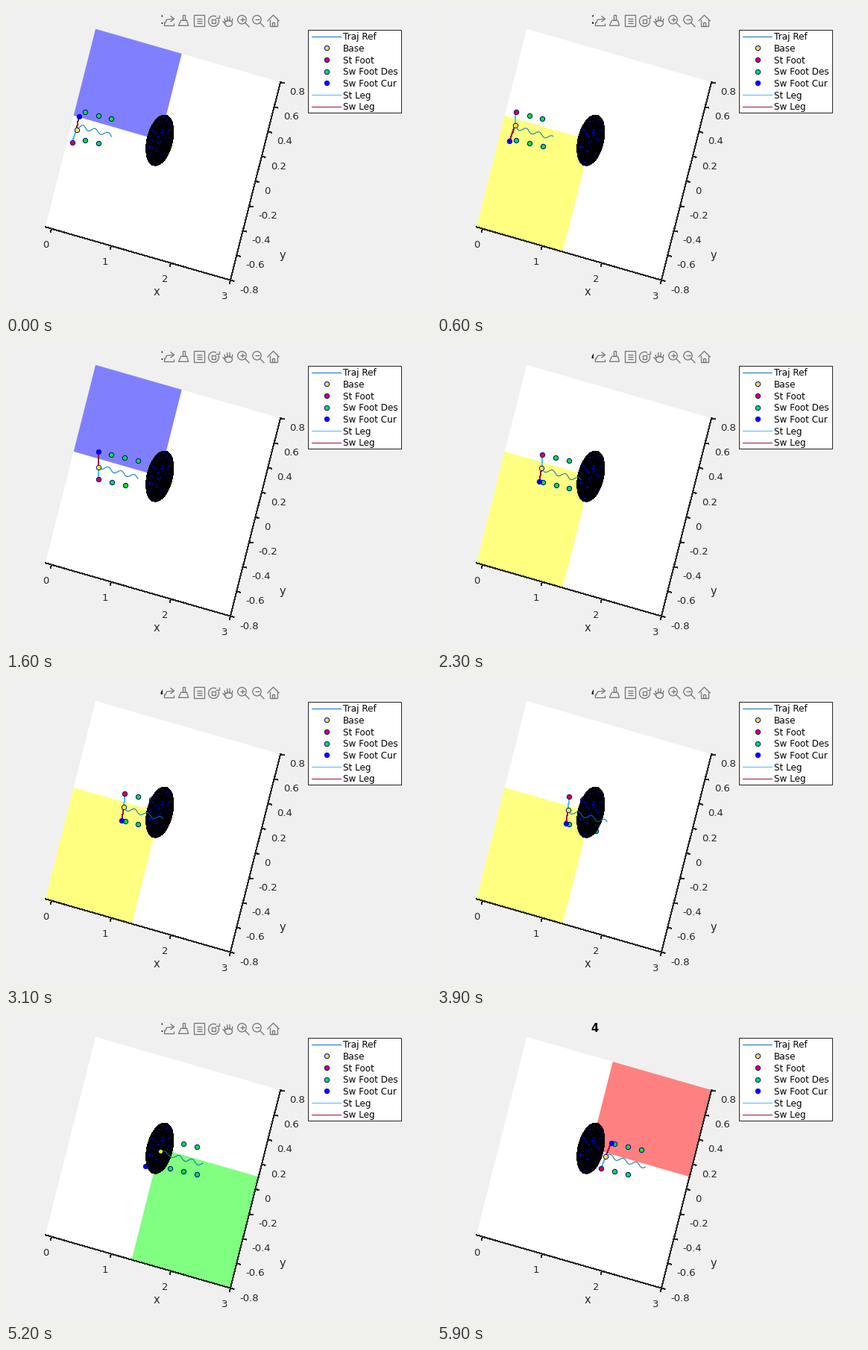
Recreate the animation shown at these times as a matplotlib script. Size 570x413 px, loop 6 s.

```python
import math

import numpy as np
import matplotlib.pyplot as plt
from matplotlib.animation import FuncAnimation
from matplotlib.patches import Polygon, Rectangle, Circle, Arc, Ellipse
from matplotlib.tri import Triangulation

W, H = 570, 413
FRAMES, INTERVAL = 60, 100
PHASES = 4                 # frames per walking step
TOOLBAR_END = 53           # toolbar disappears once the pointer leaves
REPLAN = 10                # step at which the plan bends around the disc
PX = 0.72                  # one pixel in points at 100 dpi
INK, BG, GREY = "#262626", "#f0f0f0", "#757575"
TRAJ, ST_LEG, SW_LEG = "#0072bd", "#4dbeee", "#a2142f"
CENTER_X, CENTER_Y, RADIUS = 1.345, 0.1, 0.2

plt.rcParams["font.family"] = "DejaVu Sans"
fig = plt.figure(figsize=(W / 100, H / 100), dpi=100, facecolor=BG)
ax = fig.add_axes([0, 0, 1, 1])
ax.set_xlim(0, W)
ax.set_ylim(H, 0)
ax.axis("off")


def project(x, y):
    """Floor coordinates to stage pixels."""
    return 94.5 + 80 * x + 42 * y, 165.8 + 23 * x - 166 * y


def line(xs, ys, color=INK, width=1, z=2, smooth=False):
    return ax.plot(xs, ys, color=color, lw=width * PX, zorder=z,
                   solid_capstyle="butt", antialiased=smooth)[0]


def text(x, y, s, size, ha="left", color=INK, z=4, **kw):
    return ax.text(x, y, s, fontsize=size * PX, ha=ha, va="baseline",
                   color=color, zorder=z, **kw)


def marker(color, z, edge="#0000c8", size=6.2):
    return ax.plot([], [], "o", ms=size * PX, mfc=color, mec=edge,
                   mew=1.1 * PX, zorder=z)[0]


def floor_patch(x0, x1, y0, y1, color, z):
    corners = [(x0, y0), (x1, y0), (x1, y1), (x0, y1)]
    patch = Polygon([project(*c) for c in corners], fc=color, ec="none", zorder=z)
    return ax.add_patch(patch)


# --- floor, axes, disc and legend ---

def draw_axes():
    floor_patch(-0.1, 3, -0.8, 0.8, "white", 0)
    line(*project(np.array([-0.1, 3, 3]), np.array([-0.8, -0.8, 0.8])))
    for i in range(4):
        x, y = project(i, -0.8)
        line([x, x - 1.3], [y, y + 5])
        text(x - 7.6, y + 25.7, str(i), 13.3, "center")
    for i in range(-4, 5):
        x, y = project(3, i / 5)
        line([x, x + 5], [y, y + 1.4])
        text(x + 12, y + 17, f"{i / 5:g}", 13.3)
    text(202.3, 388.5, "x", 14.6, "center")
    text(371, 339.5, "y", 14.6, "center")


def ring(radius, angle):
    return project(CENTER_X + radius * np.cos(angle),
                   CENTER_Y + radius * np.sin(angle))


def draw_disc():
    """Round obstacle with a dense triangle mesh."""
    rng = np.random.default_rng(4)
    inner = ring(0.185 * np.sqrt(rng.random(130)), 2 * np.pi * rng.random(130))
    rim = ring(RADIUS, np.linspace(0, 2 * np.pi, 60, endpoint=False))
    ax.add_patch(Polygon(np.transpose(rim), fc="blue", ec="black",
                         lw=PX, zorder=10))
    mesh = Triangulation(*np.hstack([inner, rim]))
    ax.triplot(mesh, color="black", lw=0.9 * PX, zorder=11, antialiased=False)


def draw_legend():
    ax.add_patch(Rectangle((404.5, 31.5), 125, 111, fc="white", ec=INK,
                           lw=PX, zorder=3, snap=True))
    rows = [("Traj Ref", TRAJ, False), ("Base", "yellow", True),
            ("St Foot", "red", True), ("Sw Foot Des", "lime", True),
            ("Sw Foot Cur", "blue", True), ("St Leg", ST_LEG, False),
            ("Sw Leg", SW_LEG, False)]
    for i, (name, color, dot) in enumerate(rows):
        y = 40.7 + 15.65 * i
        if dot:
            marker(color, 4, "blue").set_data([429.7], [y])
        else:
            line([409.5, 449], [y, y], color, 1, 4)
        text(452, y + 4.6, name, 12, color="black")


# --- toolbar ---

def draw_toolbar():
    parts = [ax.add_patch(Rectangle((209.5, 11), 159, 18, fc=BG, ec="none",
                                    zorder=21))]
    export, brush, note, orbit, hand, plus, minus, home = 218.5 + 20 * np.arange(8)
    mid = 20.3

    def stroke(cx, *pts):
        xs, ys = zip(*pts)
        parts.append(line(np.add(cx, xs), np.add(mid, ys), GREY, 1.3, 22, True))

    def shape(patch):
        patch.set(ec=GREY, fc="none", lw=1.3 * PX, zorder=22)
        parts.append(ax.add_patch(patch))

    stroke(export, (-7, 1), (-7, 6), (6, 6), (6, 3))
    stroke(export, (-5, 3), (-3, -2), (6, -3))
    stroke(export, (2, -7), (7, -3), (2, 1))

    shape(Rectangle((brush - 1.5, mid - 8), 3, 7))
    stroke(brush, (-4, -1), (4, -1), (6, 6), (-7, 6), (-4, -1))

    shape(Rectangle((note - 7, mid - 8), 14, 15))
    for y in (-3, 0, 3):
        stroke(note, (-3, y), (4, y))

    shape(Arc((orbit, mid), 14, 14, theta1=-20, theta2=300))
    shape(Rectangle((orbit - 2.5, mid - 2.5), 5, 5))
    stroke(orbit, (2, -4), (7, -4), (7, -8))

    shape(Ellipse((hand, mid + 3), 10, 8))
    for x in (-4.5, -1.5, 1.5, 4.5):
        stroke(hand, (x, 1), (x * 1.2, abs(x) - 8))
    stroke(hand, (-4, 4), (-8, 0))

    for cx in (plus, minus):
        shape(Circle((cx - 2, mid - 2), 5.7))
        stroke(cx, (2, 2), (8, 8))
        stroke(cx, (-5, -2), (1, -2))
    stroke(plus, (-2, -5), (-2, 1))

    stroke(home, (-8, 0), (0, -8), (8, 0))
    stroke(home, (-5, -2), (-5, 7), (5, 7), (5, -2))
    shape(Rectangle((home - 1.5, mid + 2), 3, 5))
    return parts


# --- gait ---

def smoothstep(t):
    t = np.clip(t, 0, 1)
    return t * t * (3 - 2 * t)


def foothold(s, now):
    """Place of foot s as planned during step `now`; odd feet are the left ones."""
    x = max(-0.016, 0.171 + 0.1108 * (s - 2))
    middle = 0.04 + 0.0028 * s if s > 0 else 0
    spread = 0.106
    if now >= REPLAN and s > REPLAN:
        # step short and wide before the disc, long after it
        if x < CENTER_X:
            spread += 0.03
        x += math.copysign(0.085, x - CENTER_X)
    return x, middle + (spread if s % 2 else -spread)


def base_x(q, now):
    x = 0.1085 * q - 0.08 * (1 - np.exp(-q))
    return x + 0.09 * smoothstep((q - 11.75) / 3) * (now >= REPLAN)


def base_path(q):
    """Planned route of the base from step time q on, swaying from foot to foot."""
    t = np.linspace(q, q + 6.1, 90)
    x = base_x(t, q)
    middle = 0.032 + 0.03 * x[0]
    sway = 0.016 * np.cos(math.pi * (t - 1.38))
    return project(x, (middle + sway) * np.minimum(1, t / 0.6))


draw_axes()
draw_disc()
draw_legend()
spans_x = [(-0.1, CENTER_X), (CENTER_X, 3)]
spans_y = [(CENTER_Y, 0.8), (-0.8, CENTER_Y)]
tints = [["#8080ff", "#ffff80"], ["#ff8080", "#80ff80"]]
zones = {(i, j): floor_patch(*spans_x[i], *spans_y[j], tints[i][j], 1)
         for i in range(2) for j in range(2)}
title = text(211.3, 24.3, "", 14.67, "center", "black", 20, weight="bold")
toolbar = draw_toolbar()
st_leg = line([], [], ST_LEG, 1, 5)
sw_leg = line([], [], SW_LEG, 1, 5)
base, stance = marker("yellow", 6), marker("red", 6)
targets, swing = marker("lime", 7), marker("blue", 8)
path = line([], [], TRAJ, 1, 12, True)
glint = marker("yellow", 13, "none", 5)   # base seen through the mesh


def update(i):
    step, phase = divmod(i, PHASES)
    title.set_text(str(phase + 1))
    for part in toolbar:
        part.set_visible(i < TOOLBAR_END)
    active = (int(step >= 12), step % 2)
    for key, zone in zones.items():
        zone.set_visible(key == active)

    px, py = base_path(i / PHASES)
    body = px[0], py[0]
    foot = project(*foothold(step, step))
    start = np.array(foothold(step - 1, step))
    end = np.array(foothold(step + 1, step))
    free = project(*(start + (end - start) * phase / PHASES))
    goals = [project(*foothold(s, step)) for s in range(step + 1, step + 6)]

    for dot, p in ((base, body), (glint, body), (stance, foot), (swing, free)):
        dot.set_data([p[0]], [p[1]])
    targets.set_data(*zip(*goals))
    st_leg.set_data(*zip(body, foot))
    sw_leg.set_data(*zip(body, free))
    path.set_data(px, py)
    return []


anim = FuncAnimation(fig, update, frames=FRAMES, interval=INTERVAL,
                     repeat=True, repeat_delay=0, blit=False)
plt.show()
```
